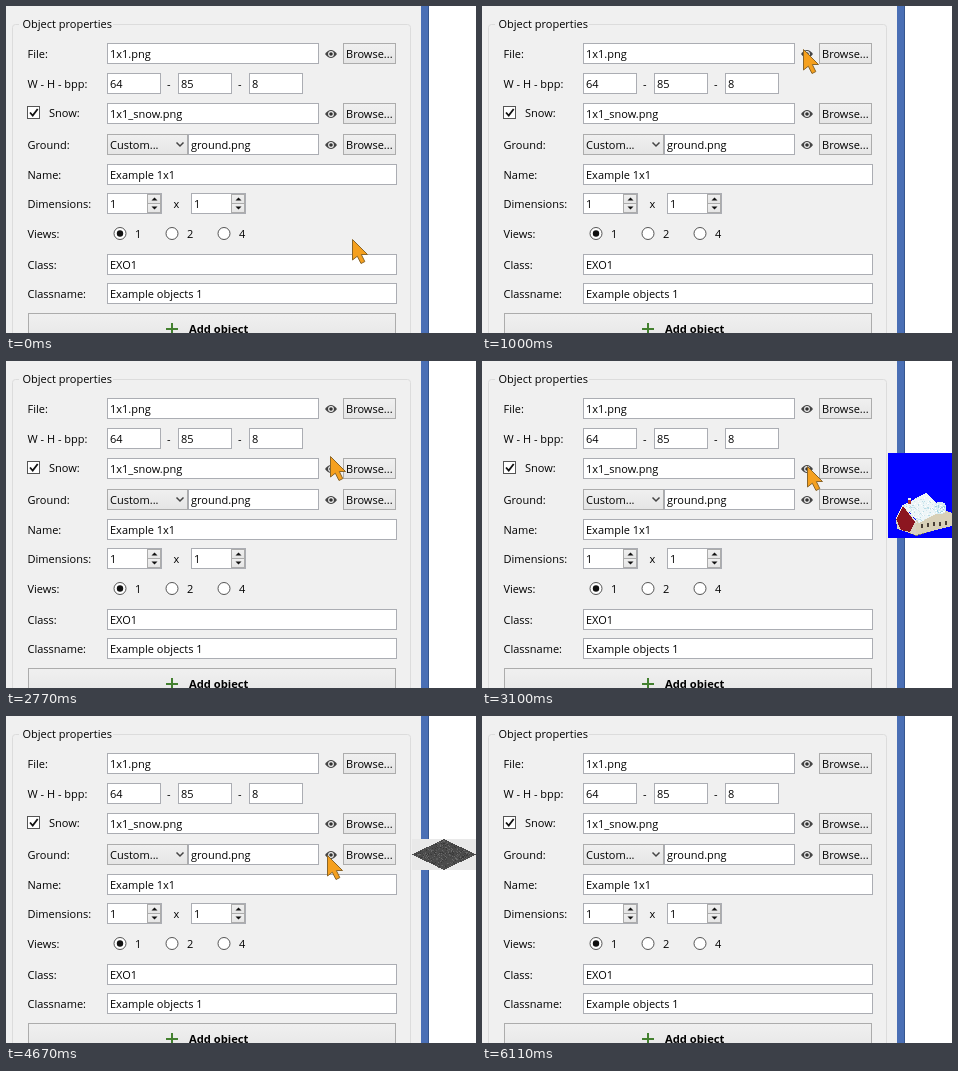
An HTML page for the animation above (6970 ms loop, 470 by 327 pixels).

```html
<!DOCTYPE html>
<html lang="en">
<head>
<meta charset="utf-8">
<title>Object properties</title>
<style>
  html, body { margin: 0; width: 100%; height: 100%; overflow: hidden; background: #fff; }
  svg { display: block; width: 470px; height: 327px; }
  text { font: 11px "Open Sans", "Noto Sans", sans-serif; fill: #000; white-space: pre; }
  .bold { font-size: 11.2px; font-weight: 700; }
  .field { fill: #fff; stroke: #abadb3; }
  .button { fill: url(#face); stroke: #acacac; }
  .hover { stroke: #7eb4ea; }
  .button.hover { fill: url(#faceHover); }
</style>
</head>
<body>
<svg id="stage" viewBox="0 0 470 327"></svg>
<script>
const LOOP = 6970, STEP = 66;
const stage = document.getElementById('stage');

let seed = 7;
const random = () => (seed = seed * 16807 % 2147483647) / 2147483647;

// Drawing helpers, all returning SVG markup
const box = (cls, x, y, w, h = 21) =>
  `<rect class="${cls}" x="${x + .5}" y="${y + .5}" width="${w - 1}" height="${h - 1}"/>`;
const fill = (color, x, y, w, h) =>
  `<rect fill="${color}" x="${x}" y="${y}" width="${w}" height="${h}"/>`;
const text = (x, y, label, cls = '') => `<text class="${cls}" x="${x}" y="${y}">${label}</text>`;
const path = (d, attrs) => `<path d="${d}" ${attrs}/>`;
const poly = (points, color) => `<polygon points="${points}" fill="${color}"/>`;

const field = (x, y, w, label) => box('field', x, y, w) + text(x + 3, y + 15, label);
const button = (x, y, w, label) => box('button', x, y, w) + text(x + 3, y + 15, label);
const eye = y =>
  path(`M319 ${y}Q325 ${y - 8} 331 ${y}Q325 ${y + 8} 319 ${y}Z`, 'fill="#444"') +
  `<circle cx="325" cy="${y}" r="2.9" fill="#f0f0f0"/><circle cx="325" cy="${y}" r="1.8" fill="#333"/>`;
const fileTools = y => eye(y + 11) + button(337, y, 53, 'Browse...');

function spinner(x, y, label) {
  const arrow = (ay, dir) =>
    path(`M${x + 44.5} ${ay}h6l-3 ${3 * dir}z`, 'fill="#111"');
  return field(x, y, 55, label) +
    box('button', x + 40, y + 1, 14, 10) + box('button', x + 40, y + 10, 14, 10) +
    arrow(y + 7.5, -1) + arrow(y + 13.5, 1);
}

function radio(x, label, checked) {
  return `<circle cx="${x}" cy="227.5" r="6" fill="#fff" stroke="#555"/>` +
    (checked ? `<circle cx="${x}" cy="227.5" r="3.2" fill="#111"/>` : '') +
    text(x + 15, 232, label);
}

// Random dots inside the parallelogram spanned by a and b from o
function speckle(o, a, b, count, colors) {
  let out = '';
  for (let i = 0; i < count; i++) {
    const u = random(), v = random();
    out += fill(colors[i % colors.length],
      Math.floor(o[0] + u * a[0] + v * b[0]), Math.floor(o[1] + u * a[1] + v * b[1]), 1, 1);
  }
  return out;
}

function house(roof, dots, leaf, leafDots) {
  let out = fill('#00f', 0, 0, 64, 85) +
    poly('8,74 28,83 64,72 56,64', '#777a70') +
    poly('27,67 28,82 64,73 64,60 52,56', '#d8d0b8') +
    poly('15,52 8,65 9,76 28,82 28,68', '#d9d2c2') +
    poly('15,53 8,66 13,77 22,79 27,69', '#8c1620') +
    poly('15,52 38,40 55,57 31,70', roof) +
    speckle([15, 53], [22, -12], [16, 17], 150, dots) +
    fill('#a33', 20, 46, 3, 5) + fill('#eee', 20, 45, 3, 2) +
    path('M15 52L8 66M15 52L29 70', 'stroke="#eee" fill="none"');
  for (let x = 33; x < 60; x += 6) out += fill('#4a4038', x, 75 - x / 8, 2, 4);
  return out + `<circle cx="52" cy="55" r="6.5" fill="${leaf}"/>` +
    speckle([47, 51], [10, 0], [0, 9], 45, leafDots);
}

const ground = fill('#e9e9e9', 0, 0, 64, 31) + poly('0,15.5 32,0 64,15.5 32,31', '#4b4b4b') +
  speckle([1, 15.5], [31, -15], [31, 15], 420, ['#383838', '#5c5c5c', '#6a6a6a', '#424242']);

const previews = [
  { from: 1400, to: 2240, y: 32, art: house('#8d5548', ['#6f3e36', '#a66d5c'], '#2f7a2c', ['#1d5a1f', '#56a043']) },
  { from: 3100, to: 3940, y: 92, art: house('#eef6f8', ['#fff', '#b9dce6', '#d2e8ee'], '#d8eef4', ['#fff', '#9fd0e0']) },
  { from: 4670, to: 5510, y: 123, art: ground }
];

const gradient = (id, top, bottom) =>
  `<linearGradient id="${id}" x2="0" y2="1"><stop stop-color="${top}"/><stop offset="1" stop-color="${bottom}"/></linearGradient>`;

stage.innerHTML =
  `<defs>${gradient('face', '#f0f0f0', '#e5e5e5')}${gradient('faceHover', '#ecf4fc', '#dcecfc')}</defs>` +
  fill('#fff', 0, 0, 470, 327) + fill('#f0f0f0', 0, 0, 415, 327) +
  fill('#4a6fb5', 415, 0, 8, 327) + fill('#36568f', 422, 0, 1, 327) +
  path('M13 18.5H9.5Q6.5 18.5 6.5 21.5V330M107 18.5H401.5Q404.5 18.5 404.5 21.5V330', 'fill="none" stroke="#dcdcdc"') +
  text(16.5, 22, 'Object properties') +
  [['File:', 52], ['W - H - bpp:', 82], ['Ground:', 143], ['Name:', 173], ['Dimensions:', 202],
    ['Views:', 232], ['Class:', 263], ['Classname:', 292]].map(([label, y]) => text(21.5, y, label)).join('') +
  field(101, 37, 212, '1x1.png') + fileTools(37) +
  field(101, 67, 54, '64') + text(161, 82, '-') + field(172, 67, 54, '85') + text(232, 82, '-') + field(243, 67, 54, '8') +
  box('field', 21, 100, 13, 13) + box('', 21, 100, 13, 13).replace('class=""', 'fill="#fff" stroke="#555"') +
  path('M24 106.5l2.7 3 5-6.5', 'fill="none" stroke="#111" stroke-width="1.8"') + text(43, 111, 'Snow:') +
  field(101, 97, 212, '1x1_snow.png') + fileTools(97) +
  button(101, 128, 81, 'Custom...') + path('M170.5 136.5l3.5 3.5 3.5-3.5', 'fill="none" stroke="#444" stroke-width="1.5"') +
  field(182, 128, 131, 'ground.png') + fileTools(128) +
  field(101, 158, 290, 'Example 1x1') +
  spinner(101, 187, '1') + text(167.5, 202, 'x') + spinner(185, 187, '1') +
  radio(114, '1', true) + radio(166, '2') + radio(218, '4') +
  field(101, 248, 290, 'EXO1') + field(101, 277, 290, 'Example objects 1') +
  box('button', 22, 307, 368, 31) +
  path('M160 323h12M166 317v12', 'stroke="#43802f" stroke-width="2"') + text(183, 327, 'Add object', 'bold') +
  previews.map(p => `<g class="preview" transform="translate(406 ${p.y})" shape-rendering="crispEdges">${p.art}</g>`).join('') +
  `<g id="pointer">` +
  path('M.5 .5V21L5.3 17.2L9 24.5L12.8 22.6L9.3 15.5H15.5Z', 'id="arrow" fill="#f5a01e" stroke="#8a6528"') +
  path('M-3 -7.5H-1Q0 -7.5 0 -6.5Q0 -7.5 1 -7.5H3M0 -7V7M-3 7.5H-1Q0 7.5 0 6.5Q0 7.5 1 7.5H3',
    'id="beam" fill="none" stroke="#000" stroke-width="1.3"') + `</g>`;

const previewNodes = [...stage.querySelectorAll('.preview')];
const [pointer, arrow, beam] = ['pointer', 'arrow', 'beam'].map(id => document.getElementById(id));
const hoverable = [...stage.querySelectorAll('.field, .button')].map(node => ({
  node, area: ['x', 'y', 'width', 'height'].map(name => +node.getAttribute(name))
}));

const smooth = p => p * p * (3 - 2 * p);
const linear = p => p;
const START = [346, 233];
// start time, number of steps, end point, easing
const moves = [
  [70, 11, 322, 40, smooth],
  [800, 4, 321, 43, linear],
  [2370, 9, 324, 102, smooth],
  [2970, 3, 325, 107, linear],
  [3940, 9, 320, 138, smooth],
  [4670, 1, 321, 139, linear],
  [5510, 6, 302, 258, p => p ** 1.2],
  [5910, 4, 290, 338, linear]
];

function pointerAt(t) {
  let [x, y] = START;
  for (const [start, steps, toX, toY, ease] of moves) {
    if (t < start) break;
    const p = ease(Math.min(steps, Math.floor((t - start) / STEP) + 1) / steps);
    x += (toX - x) * p;
    y += (toY - y) * p;
  }
  return [Math.round(x), Math.round(y)];
}

function draw(t) {
  const [x, y] = pointerAt(t);
  let overField = false;
  for (const { node, area: [left, top, w, h] } of hoverable) {
    const over = x >= left && x <= left + w && y >= top && y <= top + h;
    node.classList.toggle('hover', over);
    if (over && node.classList.contains('field')) overField = true;
  }
  pointer.setAttribute('transform', `translate(${x} ${y})`);
  arrow.style.display = overField ? 'none' : '';
  beam.style.display = overField ? '' : 'none';
  previews.forEach((p, i) => {
    previewNodes[i].style.display = t >= p.from && t < p.to ? '' : 'none';
  });
}

const begin = performance.now();
function tick() {
  draw((performance.now() - begin) % LOOP);
  requestAnimationFrame(tick);
}
tick();
</script>
</body>
</html>
```
